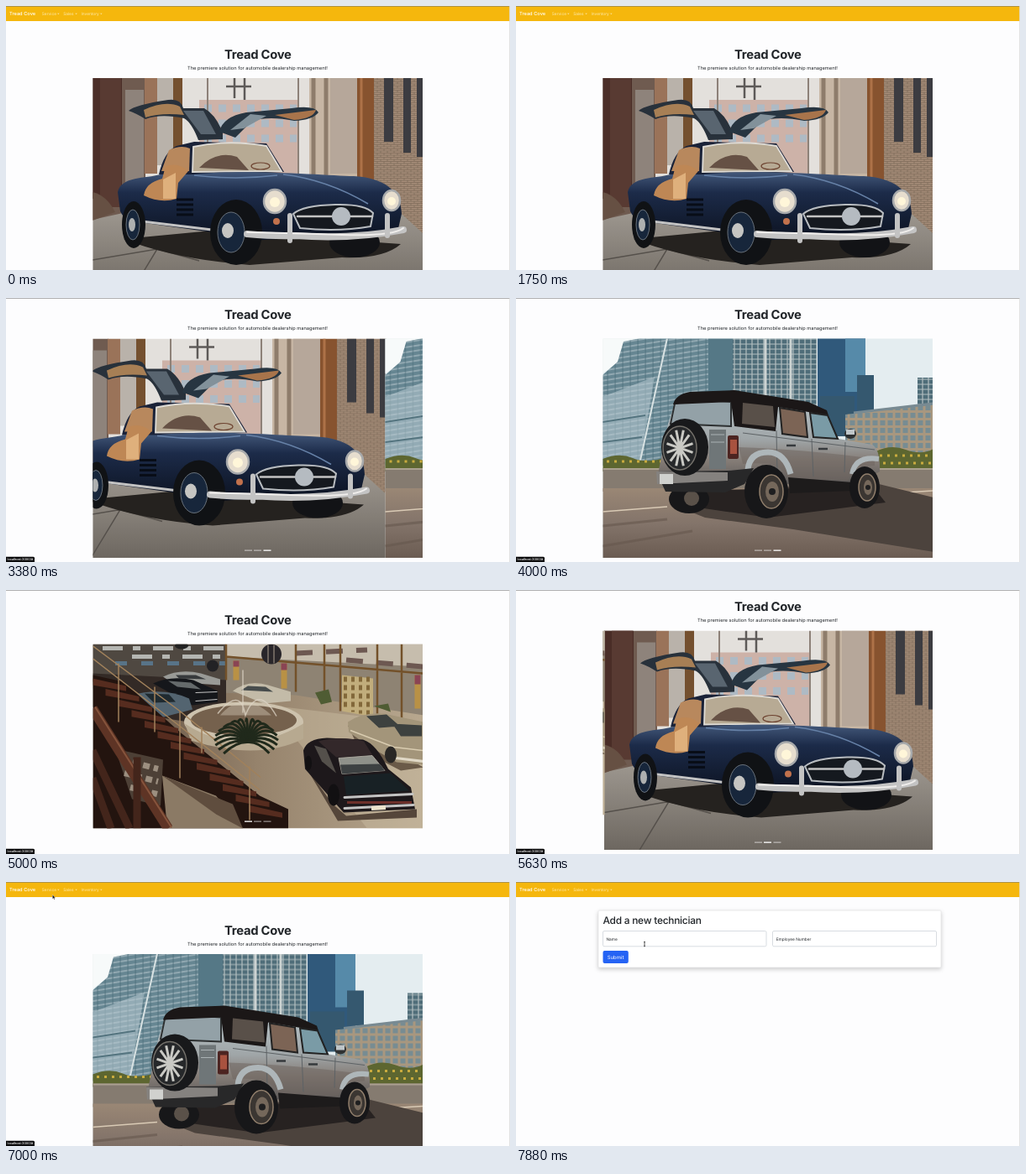
Write an HTML page that moves like this. It is 600x315 px and loops after 8000 ms.

```html
<!DOCTYPE html>
<html lang="en">
<head>
<meta charset="utf-8">
<title>Dealership demo</title>
<style>
  html, body { margin: 0; width: 100%; height: 100%; overflow: hidden; background: #fdfdfe; }
  svg { display: block; width: 600px; height: 315px; }
  text { font-family: Inter, "Open Sans", sans-serif; text-rendering: geometricPrecision; fill: #212529; }
  .link { font-size: 4.8px; fill: #fdeab0; }
  .label { font-size: 4.8px; }
  .chrome { fill: none; stroke: #c3c3c3; stroke-linecap: round; stroke-linejoin: round; }
</style>
</head>
<body>
<svg viewBox="0 0 600 315">
  <defs>
    <clipPath id="frame"><rect x="103.5" y="86" width="392.5" height="261.5"/></clipPath>
    <clipPath id="hall"><rect x="103.5" y="65" width="392.5" height="220"/></clipPath>
    <pattern id="brick" width="8" height="5" patternUnits="userSpaceOnUse">
      <rect width="8" height="5" fill="#a58c78"/>
      <path d="M0 .5H8M0 3H8M2 .5V3M6 3V5" stroke="#796555" stroke-width=".7"/>
    </pattern>
    <pattern id="glass" width="9" height="6" patternUnits="userSpaceOnUse" patternTransform="skewY(-9)">
      <rect width="9" height="6" fill="#668692"/>
      <path d="M0 1H9" stroke="#b4c5ca" stroke-width="1.1"/><path d="M1 0V6" stroke="#4c6c79" stroke-width=".8"/>
    </pattern>
    <pattern id="tower" width="7" height="6" patternUnits="userSpaceOnUse">
      <rect width="7" height="6" fill="#4f6d79"/>
      <path d="M0 1H7M1 0V6" stroke="#b3bfc0" stroke-width="1.2"/>
    </pattern>
    <pattern id="panes" width="9" height="9" patternUnits="userSpaceOnUse">
      <rect width="9" height="9" fill="#a8977f"/><rect x="1.5" y="2" width="6" height="6" fill="#778c92"/>
    </pattern>
    <linearGradient id="stone" x2="0" y2="1"><stop stop-color="#a09a92"/><stop offset="1" stop-color="#6d6760"/></linearGradient>
    <linearGradient id="navy" x2="0" y2="1"><stop stop-color="#43587a"/><stop offset=".3" stop-color="#1c2b49"/><stop offset="1" stop-color="#0c1220"/></linearGradient>
    <linearGradient id="road" x2="0" y2="1"><stop stop-color="#9a8775"/><stop offset=".5" stop-color="#83746a"/><stop offset="1" stop-color="#6a5b51"/></linearGradient>
    <linearGradient id="silver" x2="0" y2="1"><stop stop-color="#b7c2c6"/><stop offset=".45" stop-color="#a0a6a8"/><stop offset=".7" stop-color="#857d77"/><stop offset="1" stop-color="#5a5756"/></linearGradient>
    <linearGradient id="floor" x2="1" y2="0"><stop stop-color="#5a483a"/><stop offset=".5" stop-color="#96836c"/><stop offset="1" stop-color="#b8a88f"/></linearGradient>
  </defs>

  <rect width="600" height="315" fill="#fdfdfe"/>
  <g id="page">
    <g id="home">
      <text x="299.8" y="62.8" text-anchor="middle" font-size="14.8" font-weight="700" letter-spacing="-.28">Tread Cove</text>
      <text x="299.5" y="75.6" text-anchor="middle" font-size="5.7">The premiere solution for automobile dealership management!</text>
      <g clip-path="url(#frame)">
        <g id="coupe">
          <rect x="103" y="86" width="394" height="262" fill="#e3e0dc"/>
          <path d="M230 112H348V200H230Z" fill="#cdb2a8"/>
          <path d="M236 122H346M236 140H346M236 158H346" stroke="#aebac4" stroke-width="9" stroke-dasharray="9 8"/>
          <path d="M240 86V180M348 86V200" stroke="#8d8178" stroke-width="2"/>
          <path d="M262 96H292M272 86V110M284 86V112" stroke="#5d5a58" stroke-width="2.5"/>
          <path d="M103 86H166V255H103Z" fill="#6f5b50"/>
          <path d="M103 86H138V230H103Z" fill="#4a2d27"/>
          <path d="M112 86H137V240H112Z" fill="#583a32"/>
          <path d="M142 100H164V215H142Z" fill="#8e837b"/>
          <path d="M165 86H180V200H165Z" fill="#9a7359"/>
          <path d="M199 86H210V190H199Z" fill="#74502f"/>
          <path d="M180 86H199V190H180Z" fill="#b9b2aa"/>
          <path d="M361 86H418V210H361Z" fill="#c7b6a4"/>
          <path d="M366 86V205M381 86V205" stroke="#8e7c6b" stroke-width="5"/>
          <path d="M386 86H418V200H386Z" fill="#b6a79a"/>
          <rect x="438" y="86" width="59" height="192" fill="url(#brick)"/>
          <path d="M450 86H461V162H450ZM473 86H482V175H473ZM489 86H497V180H489Z" fill="#3c3c41"/>
          <path d="M418 86H438V208H418Z" fill="#87532f"/><path d="M423 86V208" stroke="#ad7248" stroke-width="3"/>
          <path d="M103 255L180 238H460L497 272V348H103Z" fill="url(#stone)"/>
          <path d="M103 222Q120 226 130 246L103 256Z" fill="#665043"/>
          <path d="M103 303L180 290 145 348M180 290L230 304" fill="none" stroke="#55504b" stroke-width="1.5"/>
          <path d="M140 278L245 268 470 284Q450 302 400 300L290 309Q200 302 140 278Z" fill="#25221f"/>
          <ellipse cx="415" cy="282" rx="30" ry="18" fill="#121316"/>
          <path d="M182 201Q188 174 203 167L224 162 310 164 331 198 222 203Z" fill="#1a2238"/>
          <path d="M222 198L223 168Q265 159 310 167L328 197Z" fill="#b7aa94" stroke="#dedbd5" stroke-width="1.8"/>
          <path d="M230 193Q250 172 275 180L289 196Z" fill="#665145"/>
          <ellipse cx="303" cy="191" rx="11" ry="4" fill="none" stroke="#6d4330" stroke-width="1.2"/>
          <path d="M133 222C137 203 166 206 184 201L224 201C280 194 380 202 414 203C450 205 470 220 471 248L466 270 290 280 246 270 166 259Q143 260 136 245Z" fill="url(#navy)"/>
          <path d="M224 202Q274 208 323 202M330 201Q382 207 431 236" fill="none" stroke="#6681a7" stroke-width="1.6"/>
          <path d="M185 197L194 172Q208 165 219 170L218 197Z" fill="#b8885d"/>
          <path d="M164 226Q166 211 186 206L190 191Q206 186 217 197L205 211 203 230Q184 236 164 226Z" fill="#be8755"/>
          <path d="M187 207L202 199V230H187Z" fill="#dfb07c"/>
          <path d="M146 125Q153 118 193 112Q208 110 211 122L236 122Q250 130 258 151V159L229 160Q221 139 212 134 184 128 166 135 155 128 146 125Z" fill="#28313b"/>
          <path d="M164 124Q190 112 207 120L212 130Q185 127 166 133Z" fill="#a77f55"/>
          <path d="M211 125L235 125 250 153 232 153Z" fill="#596570"/>
          <path d="M254 150Q258 132 286 127L340 122Q367 118 372 127 365 136 343 137 314 131 293 137L273 157Z" fill="#273541"/>
          <path d="M320 130L369 124Q366 134 343 136Z" fill="#a8744b"/>
          <path d="M267 148L291 129 310 131 283 146Z" fill="#82919a"/>
          <path d="M203 231H223M203 237H223M203 243H223M203 249H223" stroke="#080d17" stroke-width="3"/>
          <path class="chrome" d="M162 257L245 267" stroke-width="3"/>
          <g fill="#101215"><ellipse cx="152" cy="261" rx="14" ry="28"/><ellipse cx="274" cy="270" rx="31" ry="39"/></g>
          <g fill="#17263b" stroke="#68717b"><ellipse cx="151" cy="261" rx="8" ry="18"/><ellipse cx="268" cy="270" rx="16" ry="24"/></g>
          <ellipse cx="150" cy="261" rx="4" ry="8" fill="#aeb0b0"/><ellipse cx="264" cy="268" rx="7" ry="9" fill="#c5c5c2"/>
          <path d="M342 248Q353 238 392 237 427 236 437 247L434 263Q395 270 350 265Z" fill="#15191f" stroke="#b8bcc0" stroke-width="2"/>
          <path class="chrome" d="M347 251H436" stroke-width="2.5"/>
          <circle cx="399" cy="251" r="11" fill="#b5bbc1"/>
          <g fill="#e6ddce" stroke="#a7a9ab" stroke-width="2.5"><ellipse cx="320" cy="233" rx="13" ry="14"/><ellipse cx="459" cy="232" rx="10" ry="12"/></g>
          <circle cx="320" cy="234" r="6" fill="#fff6d9"/><circle cx="459" cy="233" r="5" fill="#fff6d9"/>
          <circle cx="322" cy="257" r="4" fill="#c1714c"/>
          <path class="chrome" d="M287 272Q320 275 345 274 410 279 473 267" stroke-width="8"/>
          <path class="chrome" d="M287 270Q340 271 400 273T473 265" style="stroke:#f0eeec" stroke-width="2"/>
          <path class="chrome" d="M338 250V280M454 250V274" stroke-width="6"/>
        </g>

        <g id="truck"><g transform="translate(0 37.5)">
          <rect x="103" y="48" width="394" height="262" fill="#e4edf0"/>
          <path d="M103 48H150L127 73 103 90Z" fill="#f7fafa"/>
          <path d="M103 92L121 76 128 52 148 48H229V200H103Z" fill="url(#glass)"/>
          <path d="M103 118L165 94 147 200H103Z" fill="#b9cbd1" opacity=".55"/>
          <path d="M103 148L154 140M103 172L150 166" stroke="#54747f" stroke-width="2"/>
          <path d="M180 48L147 198" stroke="#d8e2e3" stroke-width="2"/>
          <path d="M229 48H258V150H229Z" fill="#557886"/>
          <path d="M258 48H358V150H258Z" fill="url(#tower)"/>
          <path d="M327 48V130M297 48V120" stroke="#ccd3d2" stroke-width="3"/>
          <path d="M359 48H416V140H359Z" fill="#30597b"/><path d="M392 48H416V112H392Z" fill="#568aa9"/>
          <path d="M362 117H403V165H362ZM406 92H426V134H406Z" fill="#35586f"/>
          <path d="M478 95H497V130H478Z" fill="url(#tower)"/>
          <path d="M392 139L497 127V190H392Z" fill="url(#panes)"/>
          <path d="M402 137L497 126" stroke="#788a92" stroke-width="3"/>
          <path d="M103 192Q123 184 139 191T180 190V207H103ZM427 184Q445 174 464 181T497 180V208H427Z" fill="#5d6630"/>
          <path d="M108 195H174M433 188H496M437 197H496" stroke="#c9ab3e" stroke-width="3" stroke-dasharray="3 6"/>
          <path d="M103 203H497V231H103Z" fill="#857b70"/>
          <path d="M103 204H497" stroke="#aba090" stroke-width="2"/>
          <rect x="103" y="227" width="394" height="84" fill="url(#road)"/>
          <path d="M103 255L180 249M430 234L497 230" stroke="#d9cab5" stroke-width="1.5"/>
          <path d="M190 248L300 226 432 222 497 238V303L330 276 225 262Z" fill="#4c433d"/>
          <path d="M210 249L300 262 440 244 425 225 200 230Z" fill="#272221"/>
          <path d="M103 296L210 278M103 272L180 264" stroke="#66584e" stroke-width="3" opacity=".6"/>
          <ellipse cx="206" cy="240" rx="24" ry="17" fill="#171719"/><ellipse cx="209" cy="239" rx="9" ry="9" fill="#5a5149"/>
          <path d="M181 150L190 123H256L350 134 384 168 424 175Q434 181 433 207L424 212 398 224 326 222 275 219 182 223 169 210Z" fill="url(#silver)"/>
          <path d="M265 178Q340 180 427 192V200L400 202 396 218 324 215Q316 194 270 198Z" fill="#6f6761" opacity=".55"/>
          <path d="M184 150L189 126Q215 121 256 124V153Z" fill="#93a1a7" stroke="#2d3031" stroke-width="2"/>
          <path d="M187 127Q190 115 207 112L260 110 348 124 370 134 372 140 312 130 309 159 260 153 256 124Z" fill="#1b1717"/>
          <path d="M270 125L306 129 308 154 269 150Z" fill="#595049"/>
          <path d="M314 131L344 136 347 166 317 162Z" fill="#7c6455" stroke="#222" stroke-width="2"/>
          <path d="M350 137L371 140 383 168 354 166Z" fill="#7a9ba6" stroke="#222" stroke-width="2"/>
          <path d="M310 158L311 211M352 168L354 213M392 172L391 208M270 161L427 181" fill="none" stroke="#5d6265" stroke-width="1"/>
          <path d="M322 176H333M360 180H371" stroke="#363a3d" stroke-width="2.5"/>
          <path d="M276 205Q278 184 300 184 320 184 327 210" fill="none" stroke="#aeb6b9" stroke-width="7"/>
          <path d="M400 210Q404 188 432 192" fill="none" stroke="#aeb6b9" stroke-width="6"/>
          <ellipse cx="398" cy="162" rx="7" ry="6" fill="#2e3132"/><path d="M393 157H403V163H393Z" fill="#bfc6c9"/>
          <rect x="252" y="164" width="13" height="28" rx="2" fill="#4c2421"/><rect x="255" y="169" width="8" height="17" fill="#a8523f"/>
          <path d="M230 157H250V204H230Z" fill="#6f7678"/><path d="M232 163H248M232 172H248" stroke="#aab2b4"/>
          <path d="M167 207L253 206 283 203 272 222 249 232 178 231Z" fill="#282829"/><path d="M167 207L252 208V218L168 222Z" fill="#85827f"/>
          <rect x="171" y="210" width="16" height="12" fill="#d0d1ce"/>
          <ellipse cx="201" cy="178" rx="28" ry="34" fill="#18191b"/>
          <ellipse cx="195" cy="179" rx="20" ry="26" fill="#26282a" stroke="#74716b" stroke-width="1.5"/>
          <g id="spokes" fill="none" stroke="#c9c9c4" stroke-width="3"></g>
          <path d="M324 214L401 220V230L326 233Z" fill="#1d1b1b"/>
          <g fill="#171719"><ellipse cx="298" cy="231" rx="26" ry="32"/><ellipse cx="415" cy="226" rx="18" ry="25"/></g>
          <g fill="#3b3632" stroke="#917f6c" stroke-width="1.5"><ellipse cx="304" cy="231" rx="14" ry="20"/><ellipse cx="418" cy="226" rx="10" ry="16"/></g>
          <g fill="#75685b"><ellipse cx="305" cy="231" rx="8" ry="12"/><ellipse cx="419" cy="226" rx="5" ry="9"/></g>
          <circle cx="305" cy="231" r="4" fill="#1f1f20"/><circle cx="419" cy="226" r="3" fill="#1f1f20"/>
        </g></g>

        <g id="showroom"><g transform="translate(0 21)" clip-path="url(#hall)">
          <rect x="103" y="65" width="394" height="220" fill="url(#floor)"/>
          <path d="M330 140L497 160V285H430L345 178Z" fill="#cbbda3" opacity=".45"/>
          <path d="M103 65H497V150L345 126 103 118Z" fill="#8e8373"/>
          <path d="M103 65H262V110H103Z" fill="#4f4841"/>
          <path d="M262 65H497V92L262 80Z" fill="#c6bdad"/>
          <path d="M115 70H262M150 80H262" stroke="#b5b6b2" stroke-width="5" stroke-dasharray="24 12 9 15"/>
          <path d="M130 88H262" stroke="#587488" stroke-width="5" stroke-dasharray="14 17"/>
          <path d="M345 76L430 72M405 84L497 92" stroke="#6d5851" stroke-width="6" stroke-dasharray="20 16"/>
          <path d="M400 102L437 106V152L400 145Z" fill="#c1ad7c"/>
          <path d="M404 104V144M413 104V146M422 104V148M431 104V150" stroke="#82683a" stroke-width="4" stroke-dasharray="6 4"/>
          <path d="M262 65V108M345 65V122M379 65V133M398 65V145M442 65V152M471 65V154M262 80L497 100" fill="none" stroke="#73512a" stroke-width="2.5"/>
          <path d="M274 85V108M331 88V118M490 102V142" stroke="#b99145" stroke-width="7"/>
          <path d="M274 85V92M331 88V96M490 102V113" stroke="#8a4454" stroke-width="7"/>
          <circle cx="316" cy="77" r="12" fill="#29262a"/><path d="M312 66V88M319 66V88" stroke="#81766c" stroke-width="1.5"/>
          <ellipse cx="209" cy="67" rx="8" ry="4" fill="#222"/><circle cx="246" cy="91" r="7" fill="#222225"/>
          <path d="M103 100L262 108V140L230 160 103 140Z" fill="#332a26"/>
          <path d="M187 104Q207 94 232 100L255 107V114L196 110Z" fill="#999a96"/><path d="M202 102L226 102 238 107 206 106Z" fill="#373a3c"/>
          <path d="M270 121Q288 107 312 114L339 122V133L307 136Z" fill="#c3bba8"/><path d="M288 115L309 116 318 122 280 120Z" fill="#474c4c"/>
          <path d="M175 112Q197 102 223 108L252 121V134L222 138Z" fill="#15171b"/><path d="M193 109L220 111 232 119 204 116Z" fill="#656a6b"/>
          <path class="chrome" d="M226 123L251 122M226 133L251 131" stroke-width="1.2"/>
          <path d="M150 126Q186 116 218 130L222 143 184 153Z" fill="#536470"/><path d="M165 124L194 125 202 134 176 135Z" fill="#1f2a30"/>
          <ellipse cx="283" cy="158" rx="71" ry="24" fill="#cdc2ad"/>
          <path d="M213 160Q280 204 354 160V178Q300 205 220 180Z" fill="#b7a990"/>
          <ellipse cx="283" cy="156" rx="63" ry="18" fill="#75614d"/>
          <path d="M252 148Q279 115 285 150Q300 112 322 151M282 96V147" fill="none" stroke="#ded5c6" stroke-width="1.5" opacity=".75"/>
          <path d="M255 150Q282 118 316 150Z" fill="#d9cfbf" opacity=".4"/>
          <path d="M368 123L384 119 388 134 375 137ZM438 139L455 136 458 146Z" fill="#4f5c33"/>
          <path d="M407 162L497 212 470 216 420 190Z" fill="#6a5a48"/>
          <path d="M407 158Q424 146 450 148L497 158V209L465 206 432 187 408 170Z" fill="#a3957a"/>
          <path d="M429 151L453 149 469 163 444 165ZM460 160L495 162V175L470 175Z" fill="#3d413f"/>
          <path d="M410 168L462 188 497 192" fill="none" stroke="#d9ccb0" stroke-width="1.5"/>
          <path d="M464 201L497 205" stroke="#e0d8c6" stroke-width="3"/>
          <ellipse cx="458" cy="197" rx="7" ry="10" fill="#292725"/>
          <path d="M356 210L388 255 405 270 489 262V272L395 276Z" fill="#55463a"/>
          <path d="M354 192Q358 178 382 177L425 179Q441 184 455 214L482 236 487 262 402 266 384 246 356 214Z" fill="#1d181b"/>
          <path d="M372 181Q398 174 426 181L436 197 393 200Z" fill="#33282a"/>
          <path d="M396 201L436 198 451 216 400 220Z" fill="#8f918a" stroke="#b9b3a8" stroke-width=".8"/>
          <path d="M398 209L445 208 451 216 400 220Z" fill="#3d4142"/>
          <path d="M367 186L381 190 393 219 376 205Z" fill="#54504b"/>
          <path d="M402 223L458 219 480 240 405 245Z" fill="#182125"/>
          <path class="chrome" d="M403 248L484 244M403 261L485 257" stroke-width="3"/>
          <path d="M406 254H483" stroke="#6c2f2a" stroke-width="3"/><path d="M435 261L452 260" stroke="#ece3cc" stroke-width="5"/>
          <ellipse cx="390" cy="245" rx="7" ry="13" fill="#121012"/><ellipse cx="360" cy="207" rx="4" ry="9" fill="#121012"/>
          <path d="M103 102L140 110 207 170 302 246 336 262V285H103Z" fill="#23140f"/>
          <path d="M186 222L250 246 282 285H192Z" fill="#8b7a65"/>
          <path d="M186 222L270 256 282 285 250 268Z" fill="#5f4d3e"/>
          <g id="stairs" fill="#562c1f"></g>
          <path d="M130 190L187 203 184 258 150 250Z" fill="#4d4036"/><path d="M138 203L181 214M141 219L181 229M148 236L180 244" stroke="#9c8f80" stroke-width="7" stroke-dasharray="8 5"/>
          <path d="M103 67L207 145 303 224M103 82L207 163 302 239M134 88V158M177 116V170M207 145V225M233 164V195M290 211V275" fill="none" stroke="#a1815b" stroke-width="1.5"/>
          <path d="M103 142L193 285" stroke="#5e3425" stroke-width="12"/><path d="M106 140L197 284" stroke="#86543c" stroke-width="2"/>
          <path d="M103 192L147 285M156 200V285M103 225L125 285" stroke="#43251b" stroke-width="9"/>
          <g id="palm" fill="none" stroke="#20291b" stroke-width="3"></g>
        </g></g>
      </g>
      <g id="marks" fill="#fff"><rect x="284" width="9" height="1.3"/><rect x="295" width="9" height="1.3"/><rect x="306.5" width="9" height="1.3"/></g>
    </g>

    <g id="form">
      <rect x="98" y="34" width="408" height="68" rx="1" fill="#fff" stroke="#e2e2e4" stroke-width=".7" style="filter:drop-shadow(0 2px 2.5px #0003)"/>
      <text x="103.5" y="50.4" font-size="11.9" font-weight="500" letter-spacing="-.24">Add a new technician</text>
      <g fill="#fff" stroke="#cfd4da" stroke-width=".8"><rect x="103.5" y="58.5" width="194.5" height="18.3" rx="1.5"/><rect x="305.5" y="58.5" width="195" height="18.3" rx="1.5"/></g>
      <text class="label" x="107.5" y="69.6">Name</text>
      <text class="label" x="309.7" y="69.6">Employee Number</text>
      <rect x="103.5" y="82" width="30.3" height="15" rx="2" fill="#2563f4"/>
      <text x="118.6" y="91.7" text-anchor="middle" font-size="6" style="fill:#fff">Submit</text>
    </g>

    <rect width="600" height="18" fill="#f5b70d"/>
    <text x="4" y="11.2" font-size="5.7" font-weight="500" style="fill:#fff">Tread Cove</text>
    <text class="link" x="42.8" y="11">Service</text>
    <text class="link" x="68.2" y="11">Sales</text>
    <text class="link" x="89.5" y="11">Inventory</text>
    <path d="M61 8.7h2.6l-1.3 1.4ZM82.3 8.7h2.6l-1.3 1.4ZM112 8.7h2.6l-1.3 1.4Z" fill="#fdeab0"/>
  </g>
  <rect width="600" height=".8" fill="#777" opacity=".7"/>
  <rect x="599.2" width=".8" height="315" fill="#ddd"/>
  <g id="status">
    <path d="M0 308.7H32.5Q34 308.7 34 310.2V315H0Z" fill="#0b0b0c"/>
    <text x="1.6" y="313.3" font-size="3.75" font-weight="500" style="fill:#fff">localhost:3000/#</text>
  </g>
  <path id="arrow" d="M0 0V5L1.1 4 2 5.8 2.9 5.4 2.1 3.6H3.6Z" fill="#111" stroke="#fff" stroke-width=".4"/>
  <path id="beam" d="M-1-2.7Q0-2.7 0-2Q0-2.7 1-2.7M0-2V2M-1 2.7Q0 2.7 0 2Q0 2.7 1 2.7" fill="none" stroke="#222" stroke-width=".8"/>
</svg>
<script>
const $ = id => document.getElementById(id);
const LOOP = 8000, STEP = 125, SLIDE = 600, WIDTH = 392.5;
const slides = ["showroom", "coupe", "truck"];

// time, value(s); two rows with one time make a hard cut
const scroll = [[0, 0], [1875, 0], [2625, 24.5], [3000, 46], [3250, 37.5], [4850, 37.5], [4850, 21.5],
  [5050, 21.5], [5050, 37.5], [6250, 37.5], [6250, 0]];
const pointer = [[2000, 560, 262], [2625, 501, 212.5], [2900, 480, 190], [5800, 490, 160], [6125, 518, 129.5],
  [6375, 518, 129.5], [6900, 52, 9], [7125, 60, 24], [7625, 153, 74]];
// start, outgoing slide, incoming slide
const moves = [[3250, 1, 2], [4250, 2, 0], [5050, 0, 1], [5650, 1, 2]];

const ease = p => p * p * (3 - 2 * p);
const show = (id, on) => $(id).style.display = on ? "" : "none";
const place = (id, x, y) => $(id).setAttribute("transform", `translate(${x} ${y})`);

function at(track, t) {
  let i = 0;
  while (i < track.length - 1 && track[i + 1][0] <= t) i++;
  const a = track[i], b = track[i + 1];
  if (!b || t < a[0]) return a.slice(1);
  const p = ease((t - a[0]) / (b[0] - a[0]));
  return a.slice(1).map((v, k) => v + (b[k + 1] - v) * p);
}

function carousel(t) {
  const [start, from, to] = moves.filter(m => m[0] <= t).pop() || [-SLIDE, 0, 1];
  const raw = Math.min(1, (t - start) / SLIDE), p = ease(raw);
  slides.forEach((id, i) => {
    show(id, i === to || (i === from && raw < 1));
    place(id, i === to ? WIDTH * (1 - p) : -WIDTH * p, 0);
  });
  place("marks", 0, raw === 1 && to === 0 ? 297 : 338);
  [...$("marks").children].forEach((bar, i) => bar.setAttribute("opacity", i === to ? 1 : .5));
}

function draw(t) {
  const onForm = t >= 7375;
  place("page", 0, -at(scroll, t)[0]);
  carousel(t);
  show("home", !onForm);
  show("form", onForm);
  show("status", t >= 3125 && !onForm);
  const [x, y] = at(pointer, t);
  show("arrow", (t >= 2000 && t < 2900) || (t >= 5800 && t < 7500));
  show("beam", t >= 7500);
  place("arrow", x, y);
  place("beam", x, y);
}

const repeat = (n, make) => Array.from({ length: n }, (_, i) => make(i)).join("");
$("spokes").innerHTML = repeat(6, i => {
  const end = turn => {
    const a = i * Math.PI / 3 + turn;
    return `${195 + 16 * Math.cos(a)} ${179 + 22 * Math.sin(a)}`;
  };
  return `<path d="M${end(-.25)}L195 179L${end(.25)}"/>`;
});
$("stairs").innerHTML = repeat(13, i => {
  const x = 103 + i * 15.5, y = 106 + i * 12.6;
  return `<path d="M${x} ${y}l40 9v6l-40-7Z"/>`;
});
$("palm").innerHTML = repeat(19, i => {
  const a = Math.PI * (0.75 + i * 0.083), x = 286 + 38 * Math.cos(a), y = 172 + 22 * Math.sin(a);
  return `<path d="M288 182Q${(288 + x) / 2} ${y - 6} ${x} ${y + 8}"/>`;
});

function tick() {
  const t = performance.now() % LOOP;
  draw(Math.floor(t / STEP) * STEP);
  requestAnimationFrame(tick);
}
tick();
</script>
</body>
</html>
```
